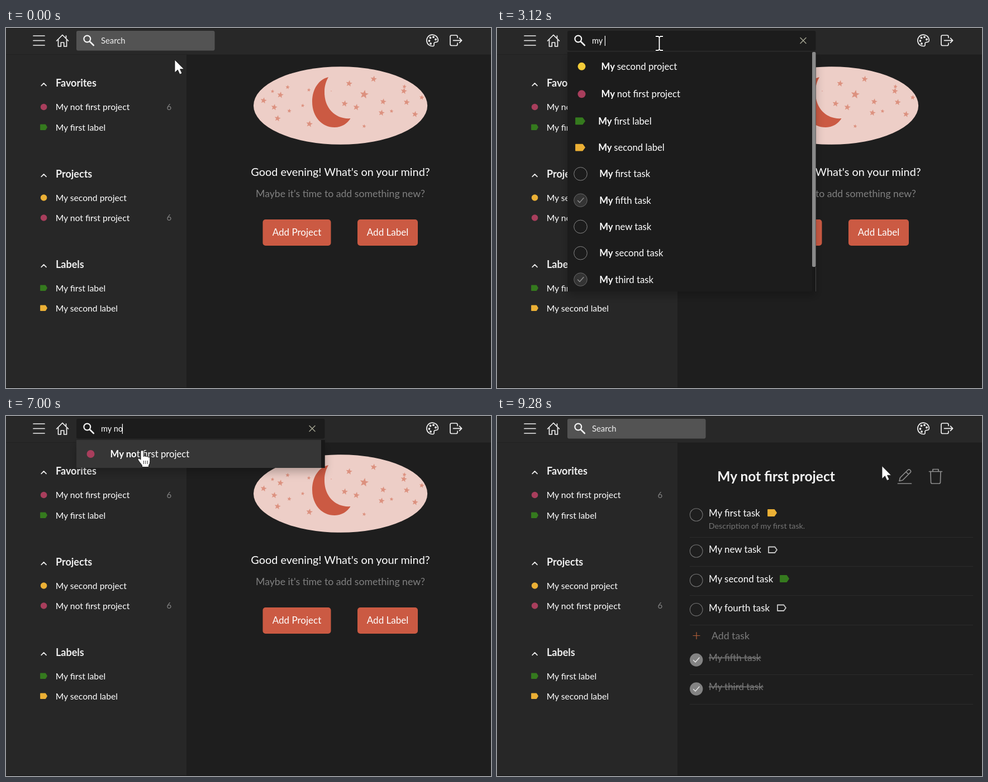
Animation of 868 by 645 pixels, one loop 9.58 s. Source, as an HTML page:

```html
<!DOCTYPE html>
<html lang="en">
<head>
<meta charset="utf-8">
<title>Task search</title>
<style>
html, body { margin: 0; width: 100%; height: 100%; overflow: hidden; background: #1e1e1e; }
svg { display: block; width: 868px; height: 645px; }
text { font-family: Lato, sans-serif; white-space: pre; fill: #fff; }
.line { fill: none; stroke: #f0f0f0; stroke-width: 1.7; stroke-linecap: round; stroke-linejoin: round; }
</style>
</head>
<body>
<svg id="stage" viewBox="0 0 868 645" xmlns="http://www.w3.org/2000/svg"></svg>
<script>
const LOOP = 9580;
const RED = '#cb5a43', YELLOW = '#ebb035', PINK = '#a83e5c', GREEN = '#357a1e', GRAY = '#838383';

// Markup helpers
const text = (x, y, size, content, attrs = '') =>
  `<text x="${x}" y="${y}" font-size="${size}" ${attrs}>${content}</text>`;
const rect = (x, y, w, h, fill, attrs = '') =>
  `<rect x="${x}" y="${y}" width="${w}" height="${h}" fill="${fill}" ${attrs}/>`;
const circle = (x, y, r, fill, attrs = '') =>
  `<circle cx="${x}" cy="${y}" r="${r}" fill="${fill}" ${attrs}/>`;
const line = (d, attrs = '') => `<path class="line" d="${d}" ${attrs}/>`;
const tag = (x, y, w, h, color, fill = color) =>
  `<path d="M${x + 1} ${y + 1}H${x + w * .72}L${x + w - 1} ${y + h / 2}L${x + w * .72} ${y + h - 1}H${x + 1}Z"
    fill="${fill}" stroke="${color}" stroke-width="1.8" stroke-linejoin="round"/>`;
const check = (x, y, color) =>
  line(`M${x - 5} ${y + .5}l3.5 3.5 7-8`, `style="stroke:${color};stroke-width:1.4"`);

function star([x, y, r]) {
  const points = Array.from({ length: 10 }, (_, i) => {
    const a = i * Math.PI / 5 - 1.4, d = i % 2 ? r * .5 : r * 1.15;
    return `${(x + d * Math.cos(a)).toFixed(1)},${(y + d * Math.sin(a)).toFixed(1)}`;
  });
  return `<polygon points="${points.join(' ')}" fill="#dc917f"/>`;
}

function sidebar() {
  const heading = (y, name) =>
    line(`M63.2 ${y + 4.3}l4.4-4.4 4.4 4.4`) +
    text(89, y + 6.3, 18, name, 'font-weight="700" style="fill:#f0f0f0"');
  const project = (y, name, color, count = '') =>
    circle(67.6, y, 5.8, color) + text(88.7, y + 5.5, 15.7, name) +
    text(287.5, y + 5.3, 15, count, `style="fill:${GRAY}"`);
  const label = (y, name, color) =>
    tag(61, y - 5.5, 13, 10.5, color) + text(88.7, y + 5.5, 15.7, name);
  return rect(0, 47, 323, 598, '#272727') +
    heading(99, 'Favorites') +
    project(141.5, 'My not first project', PINK, 6) +
    label(178, 'My first label', GREEN) +
    heading(262, 'Projects') +
    project(304, 'My second project', YELLOW) +
    project(340, 'My not first project', PINK, 6) +
    heading(424, 'Labels') +
    label(466, 'My first label', GREEN) +
    label(502, 'My second label', YELLOW);
}

function header() {
  const dots = [[757.5, 23], [759.5, 17.5], [765, 16.2], [769, 20.5], [760, 28]];
  return rect(0, 0, 868, 47, '#282828') + rect(0, 47, 868, 1, '#222') + rect(0, 0, 868, 1, '#1b1b1b') +
    line('M49 14H69M49 22.5H69M49 31H69') +
    line('M90.5 23L101 12.5 111.5 23M107.5 18.5V14M93.5 21V33H98.3V26H103.7V33H108.5V21') +
    line('M773.3 21.5A10.2 10.2 0 1 0 765 32.3C767.5 31.5 765 28.5 766.5 26.5C768.5 24 773.5 27.5 773.3 21.5Z') +
    dots.map(([x, y]) => circle(x, y, 1.9, '#f0f0f0')).join('') +
    line('M808 17.5V15.5Q808 13 805.5 13H797.5Q795 13 795 15.5V29Q795 31.5 797.5 31.5H805.5Q808 31.5 808 29V27M800.5 22.3H815.5M811.5 18.2L815.6 22.3 811.5 26.4');
}

function welcomePage() {
  const stars = [
    [461, 130, 5], [477, 113.5, 3], [491, 120, 5.2], [504, 106, 3.5], [480, 142, 5], [507, 148.5, 3.4],
    [486, 162, 5], [531, 139, 3], [542, 111, 3], [543, 172, 5.3], [582, 113, 1], [614, 99.5, 5.2],
    [606, 135.5, 5.2], [627, 142, 5.2], [641, 119, 7], [658, 91.5, 5.2], [641, 176, 3.2], [672, 152, 5],
    [675, 132, 5], [690, 149, 3.2], [713, 105, 3.4], [712, 113, 5], [717, 133, 5], [732, 154.5, 5], [744, 124.5, 4]
  ];
  const button = (x, w, name) =>
    rect(x, 343, w, 47, RED, 'rx="5"') + text(x + w / 2, 372, 17, name, 'text-anchor="middle"');
  return `<ellipse cx="598.6" cy="139" rx="155.6" ry="69.8" fill="#edcec7"/>` +
    `<path d="M577 88C560 92 548 109 548 132C548 160 566 178 588 178C601 178 611 171 616.5 162C592 164 569 146 570 113C570 104 573 95 577 88Z" fill="${RED}"/>` +
    stars.map(star).join('') +
    text(598.5, 264.5, 19.85, "Good evening! What's on your mind?", 'text-anchor="middle"') +
    text(598.5, 303, 17.65, "Maybe it's time to add something new?", 'text-anchor="middle" style="fill:#808080"') +
    button(459.5, 122, 'Add Project') + button(629, 108, 'Add Label');
}

function projectPage() {
  const rule = y => rect(345, y, 507, 1, '#2b2b2b');
  const open = (y, name) =>
    circle(356.7, y, 11.3, 'none', 'stroke="#747474" stroke-width="1.1"') + text(379, y + 3, 16.9, name);
  const done = (y, name) =>
    circle(356.7, y, 11.7, GRAY) + check(356.5, y, '#e8e8e8') +
    text(379, y + 2, 16.9, name, 'style="fill:#777;text-decoration:line-through"');
  const icon = 'style="stroke:#8c8c8c"';
  return text(394.3, 117, 24.5, 'My not first project', 'font-weight="700" style="fill:#f4f4f4"') +
    line('M717.5 121H741.5M720 116.5L721.5 110.5 735.5 96.5Q737.5 95 739.5 97T740 101L726 115ZM732 100L736.5 104.5', icon) +
    line('M773.5 99.5H796.5M780 99V95.5H790V99M776 100L776.5 118.5Q776.5 121 779 121H791Q793.5 121 793.5 118.5L794 100', icon) +
    open(177, 'My first task') + tag(484, 167, 17, 13, YELLOW) +
    text(378.8, 202.3, 14.3, 'Description of my first task.', 'style="fill:#757575"') +
    open(242, 'My new task') + tag(485, 233.5, 17, 12.5, '#c8c8c8', 'none') +
    open(294.5, 'My second task') + tag(506, 285, 17, 13, GREEN) +
    open(346.8, 'My fourth task') + tag(501, 337.5, 17, 12.5, '#c8c8c8', 'none') +
    line('M351 393.5H363M357 387.5V399.5', 'style="stroke:#b5603a;stroke-width:1.2"') +
    text(384, 399.8, 17.7, 'Add task', 'style="fill:#7c7c7c"') +
    done(437, 'My fifth task') + done(489, 'My third task') +
    [217, 269, 321, 374, 463, 516].map(rule).join('');
}

// Search field and its results
const ITEMS = [
  ['project', 'My second project', '#f3cc38'], ['project', 'My not first project', PINK],
  ['label', 'My first label', GREEN], ['label', 'My second label', YELLOW],
  ['task', 'My first task'], ['task', 'My fifth task', 'done'], ['task', 'My new task'],
  ['task', 'My second task'], ['task', 'My third task', 'done'], ['task', 'My fourth task']
];
const TEXT_X = { project: 186.6, label: 181.2, task: 183.2 };

function resultIcon(kind, y, detail) {
  if (kind === 'project') return circle(151.5, y, 7, detail);
  if (kind === 'label') return tag(140, y - 6.5, 18, 13, detail);
  const isDone = detail === 'done';
  return circle(149.5, y, 11.8, isDone ? '#343434' : 'none', `stroke="${isDone ? '#666' : '#858585'}"`) +
    (isDone ? check(149.5, y, '#909090') : '');
}

function dropdown(query, hovered) {
  const found = ITEMS.filter(([, name]) => name.toLowerCase().startsWith(query));
  const overflows = found.length > 9;
  let top = overflows ? 44.1 : 43.3, rows = '';
  for (const [kind, name, detail] of found) {
    const height = kind === 'project' ? 49.5 : 47.3, y = top + height / 2;
    const n = query.length;
    rows += resultIcon(kind, y, detail) +
      text(TEXT_X[kind], y + 6, 16.7, `<tspan font-weight="700">${name.slice(0, n)}</tspan>${name.slice(n)}`);
    top += height;
  }
  const bottom = Math.min(Math.round(top), 472);
  return rect(126, 43, 444.5, bottom - 43, '#1c1c1c', 'filter="url(#shadow)"') +
    (hovered ? rect(126, 43, 438, bottom - 43, '#363636') : '') +
    `<g clip-path="url(#list)">${rows}</g>` +
    rect(564, 43, 6.5, bottom - 43, '#181818') +
    (overflows ? rect(564, 43, 6.5, 385, '#8a8a8a', 'rx="2"') + rect(570, 428, 1, 44, '#444') : '');
}

function searchBar(dark, wide, query, caretOn) {
  const shade = Math.round(83 - 55 * dark);
  return rect(126, 5, 247.5 + 197 * wide, 35.5, `rgb(${shade},${shade},${shade})`, 'rx="3"') +
    circle(145.3, 19.5, 5.9, 'none', 'stroke="#f4f4f4" stroke-width="2.2"') +
    line('M150 24.3L156.8 31', 'style="stroke-width:2.6"') +
    (query ? text(170, 28, 14.6, query) : text(170, 28, 14.8, 'Search', 'style="fill:#f0f0f0"')) +
    (wide ? line('M543 17.5L553 27.5M553 17.5L543 27.5', `style="stroke:#a3a391;stroke-width:1.5;opacity:${wide}"`) : '') +
    (caretOn ? rect(CARET_X[query.length], 14, 1.2, 18, '#fff') : '');
}

const POINTERS = {
  arrow: `<path d="M0 0V23L5.3 18 9 26 13 24.3 9.5 16.7H16.5Z" fill="#fff" stroke="#111" stroke-width=".8"/>`,
  beam: ['stroke="#000" stroke-width="4"', 'stroke="#fff" stroke-width="2"'].map(s =>
    `<path d="M-6.5-12.5H-2L0-11 2-12.5H6.5M0-11V11M-6.5 12.5H-2L0 11 2 12.5H6.5" fill="none" ${s}/>`).join(''),
  hand: `<path d="M-2 2.5a2.5 2.5 0 0 1 5 0V11q2-2 4.3 0 2.2-1.3 4 1 3-.8 3.5 2.2V20q0 4-2.3 7V30H.5V27L-6 18.5q-2-3 0-4.2 2-.6 4 2.4Z" fill="#fff" stroke="#111"/>` +
    `<path d="M3.5 18.5v6M7 18.5v6M10.5 18.5v6" stroke="#333"/>`
};

// Timeline
const CARET_X = [170.6, 182.6, 189.6, 192.8, 200.6, 207.8];
const QUERIES = [[0, ''], [1410, 'm'], [1950, 'my'], [3120, 'my '], [3580, 'my n'], [4830, 'my no'], [9120, '']];
const CARET_ON = [[320, 870], [1410, 2510], [3060, 4120], [4660, 5360], [5960, 6440], [7000, 7550], [8100, 8650]];
const PATH = [
  [0, 302, 57], [160, 290.5, 21.5], [240, 290.5, 21.5], [320, 290.5, 29.5], [400, 290.5, 27.5],
  [6120, 290.5, 27.5], [6440, 243, 61.5], [7868, 243, 61.5], [8180, 403, 92], [8450, 560, 126],
  [8700, 652, 129], [8882, 689, 93], [9120, 689, 93], [9280, 689, 89.5], [LOOP, 689, 89.5]
];

const ramp = (t, start, steps) => Math.max(0, Math.min(steps, Math.floor((t - start) / 80) + 1)) / steps;
const snap = (t, base, step) => base + Math.floor((t - base) / step) * step;

// The pointer moves in coarse steps
function pointerAt(t) {
  const s = t < 1000 ? snap(t, 0, 80) : t < 7800 ? snap(t, 6200, 80) : t < 9000 ? snap(t, 8180, 78) : snap(t, 9120, 80);
  const i = Math.max(1, PATH.findIndex(p => p[0] >= s));
  const [t0, x0, y0] = PATH[i - 1], [t1, x1, y1] = PATH[i];
  const k = (s - t0) / (t1 - t0);
  return [x0 + (x1 - x0) * k, y0 + (y1 - y0) * k];
}

document.getElementById('stage').innerHTML = `
  <defs>
    <filter id="shadow" x="-20%" y="-60%" width="140%" height="260%">
      <feDropShadow dx="0" dy="8" stdDeviation="8" flood-color="#000" flood-opacity=".24"/>
    </filter>
    <clipPath id="list"><rect x="126" y="43" width="438" height="429"/></clipPath>
  </defs>
  ${rect(0, 0, 868, 645, '#1e1e1e')}
  <g id="welcome">${welcomePage()}</g>
  <g id="project">${projectPage()}</g>
  ${sidebar()}${header()}${rect(0, 644, 868, 1, '#151515')}
  <g id="search"></g>
  <g id="pointer"></g>`;
const [welcome, project, search, pointer] =
  ['welcome', 'project', 'search', 'pointer'].map(id => document.getElementById(id));

const drawn = new Map();
function put(node, markup) {
  if (drawn.get(node) === markup) return;
  drawn.set(node, markup);
  node.innerHTML = markup;
}

function render(t) {
  const opened = t >= 7230;
  welcome.style.display = opened ? 'none' : '';
  project.style.display = opened ? '' : 'none';

  const query = QUERIES.findLast(([start]) => t >= start)[1];
  const caretOn = CARET_ON.some(([from, to]) => t >= from && t < to);
  const closing = ramp(t, 9120, 3);
  const [x, y] = pointerAt(t);
  const overRow = query !== '' && x < 564 && y >= 43 && y <= 93;
  const kind = overRow ? 'hand' : x < 570 && y < 41 ? 'beam' : 'arrow';

  put(search, searchBar(ramp(t, 80, 2) - closing, ramp(t, 320, 2) - closing, query, caretOn) +
    (query ? dropdown(query, overRow) : ''));
  put(pointer, `<g transform="translate(${x.toFixed(1)} ${y.toFixed(1)})">${POINTERS[kind]}</g>`);
}

const start = performance.now();
function tick() {
  render((performance.now() - start) % LOOP);
  requestAnimationFrame(tick);
}
tick();
</script>
</body>
</html>
```
